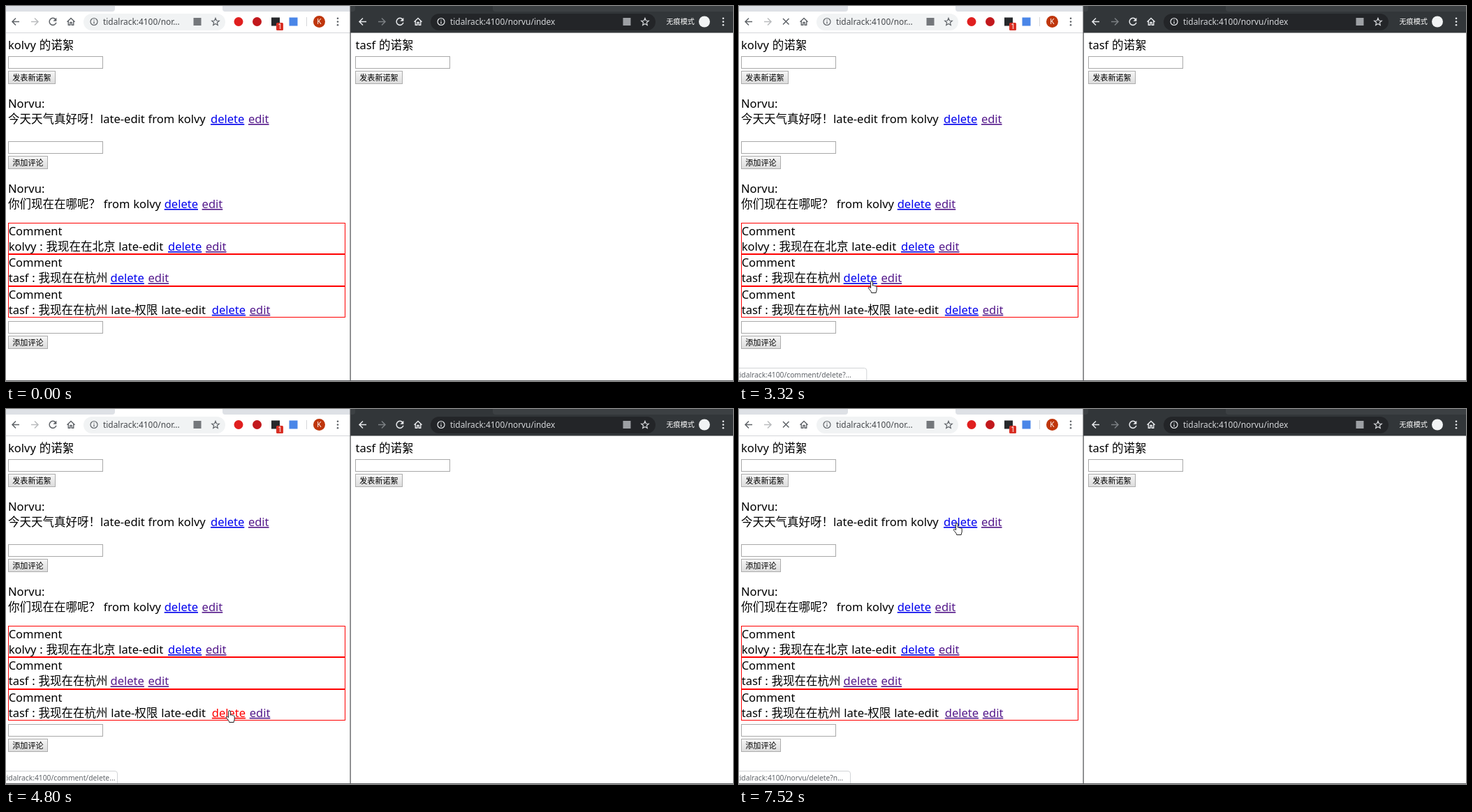
These frames come from a looping animation (1041 px wide and 538 px high, 7990 ms). An HTML page:

```html
<!DOCTYPE html>
<html lang="zh">
<head>
<meta charset="utf-8">
<title>Comment permissions</title>
<style>
html, body { margin: 0; width: 100%; height: 100%; overflow: hidden; background: #fff; }
svg { display: block; width: 100%; height: 100%; }
text { font-family: "Noto Sans", "Noto Sans CJK SC", "Noto Sans CJK", sans-serif; white-space: pre; }
.page { font-size: 16.5px; word-spacing: .5px; }
.link { text-decoration: underline; }
.btn { font-size: 11.1px; }
.url { font-size: 11.9px; }
.tip { font-size: 10.25px; fill: #5f6368; }
.small { font-size: 10.1px; fill: #fff; }
</style>
</head>
<body>
<svg id="stage" viewBox="0 0 1041 538" xmlns="http://www.w3.org/2000/svg"></svg>
<script>
const LOOP = 7990;
const BLUE = '#0000ee', PURPLE = '#551a8b', RED = '#ff0000';
const HOST = 'tidalrack:4100/';

// ---------- drawing helpers ----------
const text = (x, y, s, cls = 'page', extra = '') =>
  `<text x="${x}" y="${y}" class="${cls}" ${extra}>${s}</text>`;
const rect = (x, y, w, h, fill, extra = '') =>
  `<rect x="${x}" y="${y}" width="${w}" height="${h}" fill="${fill}" ${extra}/>`;
const frame = (x, y, w, h, fill, color) =>
  rect(x + .5, y + .5, w - 1, h - 1, fill, `stroke="${color}"`);
const dot = (x, y, r, fill) => `<circle cx="${x}" cy="${y}" r="${r}" fill="${fill}"/>`;
const line = (d, color, w = 1.5, extra = '') =>
  `<path d="${d}" fill="none" stroke="${color}" stroke-width="${w}" ${extra}/>`;

// ---------- page content ----------
const form = (x, y, label) => {
  const w = label.length * 11 + 13;
  return frame(x, y, 136, 18, '#fff', '#a9a9a9') +
    frame(x, y + 21, w, 19, 'url(#face)', '#adadad') +
    text(x + 6.2, y + 35, label, 'btn');
};

const linkSpots = [];
const entry = (id, x, y, title, body, linkX) => {
  const base = y + 22, editX = linkX + 53.9;
  linkSpots.push([linkX, 48.5, base], [editX, 30, base]);
  return text(x, y, title) + text(x, base, body) +
    text(linkX, base, 'delete', 'page link', `id="${id}" fill="${BLUE}"`) +
    text(editX, base, 'edit', 'page link', `fill="${PURPLE}"`);
};

const posts = [
  ['今天天气真好呀！late-edit from kolvy', 293],
  ['你们现在在哪呢？ from kolvy', 226.7]
];
const notes = [
  ['kolvy : 我现在在北京 late-edit', 232],
  ['tasf : 我现在在杭州', 149.6],
  ['tasf : 我现在在杭州 late-权限 late-edit', 294.8]
];
const noteTop = i => Math.round(311 + 45.33 * i);

const pages =
  text(3, 62, 'kolvy 的诺絮') + form(3, 72, '发表新诺絮') +
  posts.map(([s, x], i) => entry('post' + i, 3, 146 + 122 * i, 'Norvu:', s, x)).join('') +
  form(3, 194, '添加评论') +
  notes.map(([s, x], i) =>
    frame(3, noteTop(i), 483, noteTop(i + 1) - noteTop(i), 'none', RED) +
    entry('note' + i, 3.7, 329 + 45.4 * i, 'Comment', s, x)).join('') +
  form(3, 452, '添加评论') +
  text(500.5, 62, 'tasf 的诺絮') + form(500, 72, '发表新诺絮');

// ---------- browser bars ----------
function star(x, c) {
  let pts = '';
  for (let i = 0; i < 10; i++) {
    const a = i * Math.PI / 5, r = i % 2 ? 2.5 : 5.6;
    pts += `${x + r * Math.sin(a)},${23 - r * Math.cos(a)} `;
  }
  return `<polygon points="${pts}" fill="none" stroke="${c}" stroke-width="1.2"/>`;
}
const menu = (x, c) => [-1, 0, 1].map(i => dot(x, 22.5 + 4.7 * i, 1.3, c)).join('');

const nav = (dx, side, color, dim) =>
  `<g transform="translate(${dx} 0)">` +
  line('M19 22.5H9.5M14 17.5L9 22.5L14 27.5', color) +
  line('M36 22.5H45.5M41 17.5L46 22.5L41 27.5', dim) +
  `<g id="${side}Reload">` + line('M71 19.2A5 5 0 1 0 71.9 23.8', color) +
  `<path d="M72.4 16.8V21.8H67.4z" fill="${color}"/></g>` +
  line('M63 18L71.5 26.5M71.5 18L63 26.5', color, 1.5, `id="${side}Stop" visibility="hidden"`) +
  line('M87.5 22.8L93 17.5L98.5 22.8M89.3 21.5V27.3H91.8V23.5H94.2V27.3H96.7V21.5', color, 1.4) +
  line('M126 22V25.4M126 19.4V20.8M121 22.5a5 5 0 1 0 10 0a5 5 0 1 0 -10 0', color, 1.2) +
  '</g>';

const leftBar =
  rect(0, 0, 493, 38, '#fff') +
  '<path d="M0 0H156V4Q156 8 152 8H0zM310 0H493V8H314Q310 8 310 4z" fill="#dee1e6"/>' +
  rect(0, 38, 493, 1, '#d5d7da') +
  rect(111, 11, 203, 24, '#f1f3f4', 'rx="12"') +
  nav(0, 'left', '#5f6368', '#babcbe') +
  text(139, 27, HOST + 'nor...', 'url', 'fill="#45484c"') +
  rect(268.5, 17, 11, 11, '#74777b', 'id="pageIcon"') + star(300, '#5f6368') +
  dot(333, 22.5, 6.5, '#e01f1f') + dot(359.5, 22.5, 6.5, '#c2181c') +
  rect(380, 16.5, 12, 12, '#26282b') +
  '<g id="badge">' + rect(387, 24, 10, 11, '#d93025', 'rx="1.5"') + text(389.3, 33, '1', 'small') + '</g>' +
  rect(405.5, 16.5, 12, 12, '#4a86e8') + rect(430, 16, 1, 13, '#d5d7da') +
  dot(448.5, 22.5, 8.5, '#bf360c') + text(445.3, 26.3, 'K', 'small') + menu(475, '#5f6368');

const rightBar =
  rect(493, 0, 548, 38.5, '#323639') +
  '<path d="M493 0H500V4Q500 8 496 8H493zM697 0H1041V8H701Q697 8 697 4z" fill="#3c4043"/>' +
  rect(608, 11, 322, 24, '#232528', 'rx="12"') +
  nav(497, 'right', '#e8eaed', '#7b7f83') +
  text(636, 27, HOST + 'norvu/index', 'url', 'fill="#d3d5d8"') +
  rect(883.5, 17, 11, 11, '#9da0a4') + star(915, '#d8dadd') +
  text(945.5, 26.3, '无痕模式', 'small') + dot(1000, 22.5, 8, '#f1f3f4') + menu(1027, '#e8eaed');

const overlay =
  '<g id="status"><path id="bubble" fill="#fff" stroke="#d2d4d7"/>' +
  text(-3, 532.5, '', 'tip', 'id="tip"') + '</g>' +
  rect(492.5, 0, 1.2, 538, '#4a4c4f') + rect(0, 537, 1041, 1, '#5a5c5f') +
  '<g id="cursor" fill="#fff" stroke="#222" stroke-linejoin="round">' +
  '<path id="arrow" d="M.5 .5V15L3.8 11.8L6 17.3L8.2 16.4L6 11H10.3z"/>' +
  '<path id="hand" transform="translate(-5.6 0)" d="M4.2 10.5V2.2a1.4 1.4 0 0 1 2.8 0V7.3' +
  'a1.2 1.2 0 0 1 2.2 .4a1.2 1.2 0 0 1 2 .5a1 1 0 0 1 1.6 .9V13c0 1.5-1 2.3-1 4.5H5.3' +
  'C5 15 2.5 13 1 10.8c-.6-1 .7-2 1.7-1.2z"/></g>';

const el = id => document.getElementById(id);
el('stage').innerHTML =
  '<defs><linearGradient id="face" x2="0" y2="1"><stop stop-color="#f6f6f6"/>' +
  '<stop offset="1" stop-color="#dcdcdc"/></linearGradient></defs>' +
  rect(0, 0, 1041, 538, '#fff') + pages + leftBar + rightBar + overlay;

// ---------- motion ----------
const STEP = 76; // screen refresh while the pointer moves

// Each sweep is a curve from one resting point to the next, bent towards `via`
const sweeps = [
  { at: 220, steps: 10, from: [862, 518], via: [500, 440], to: [341, 440] },
  { at: 1070, steps: 12, from: [341, 440], via: [245, 405], to: [190, 394] },
  { at: 3644, steps: 8, from: [190, 394], via: [333, 410], to: [320, 432] },
  { at: 5730, steps: 12, from: [320, 432], via: [400, 62], to: [312, 163] }
];

// Hovered delete links: when the address shows, the press, and the page load
const remove = HOST + 'comment/delete?comment_id=';
const visits = [
  { link: 'note2', url: remove + 48, enter: 900, leave: 1140 },
  { link: 'note1', url: remove + 47, enter: 1790, leave: 3720, press: 2850, done: 3700 },
  { link: 'note2', url: remove + 48, enter: 4180, leave: 5370, press: 4730, done: 5370, wait: '正在连接...' },
  { link: 'post0', url: HOST + 'norvu/delete?norvu_id=9', enter: 6510, leave: LOOP, press: 7370, done: LOOP }
];
const clicks = visits.filter(v => v.press);
const HOLD = 140;

const clamp = v => Math.max(0, Math.min(1, v));
const within = (t, a, b) => t >= a && t < b;
const show = (id, on) => el(id).setAttribute('visibility', on ? 'visible' : 'hidden');

function moveCursor(t) {
  const s = sweeps.filter(k => k.at <= t).pop();
  let over = false;
  if (s) {
    const p = clamp(Math.floor((t - s.at) / STEP) / s.steps), q = 1 - p;
    const [x, y] = [0, 1].map(i => q * q * s.from[i] + 2 * p * q * s.via[i] + p * p * s.to[i]);
    over = linkSpots.some(([lx, w, base]) => within(x, lx, lx + w) && within(y, base - 15, base + 5));
    el('cursor').setAttribute('transform', `translate(${x.toFixed(1)} ${y.toFixed(1)})`);
  }
  show('arrow', s && !over);
  show('hand', over);
}

// The bubble fades in on hover, widens after a while, and fades out a little after leaving
function showTip(t) {
  const v = visits.filter(k => k.enter <= t).pop();
  const alpha = v ? clamp((t - v.enter) / 200) * clamp(1 - (t - v.leave - 250) / 200) : 0;
  el('status').setAttribute('opacity', alpha);
  if (!alpha) return;
  const waiting = v.wait && t >= v.done - 70;
  const grow = v.wait ? 0 : clamp((t - v.enter - 1450) / 250);
  const w = 160 + 72 * grow;
  const short = v.url.slice(0, 29 + Math.floor(grow * 4)) + '...';
  el('tip').textContent = waiting ? v.wait : grow < 1 ? short : v.url;
  el('bubble').setAttribute('d', `M-1 519.5H${w - 4}Q${w - .5} 519.5 ${w - .5} 523V539H-1z`);
}

function showLoading(t) {
  const loading = clicks.some(v => within(t, v.press + HOLD, v.done));
  const fresh = clicks.some(v => within(t, v.done, v.done + 220));
  show('leftReload', !loading);
  show('leftStop', loading);
  show('pageIcon', !fresh);
  show('badge', !fresh);
  for (const v of clicks) {
    const pressed = within(t, v.press, v.press + HOLD);
    el(v.link).setAttribute('fill', pressed ? RED : t >= v.done ? PURPLE : BLUE);
  }
}

function tick() {
  const t = performance.now() % LOOP;
  moveCursor(t);
  showTip(t);
  showLoading(t);
  requestAnimationFrame(tick);
}
tick();
</script>
</body>
</html>
```
